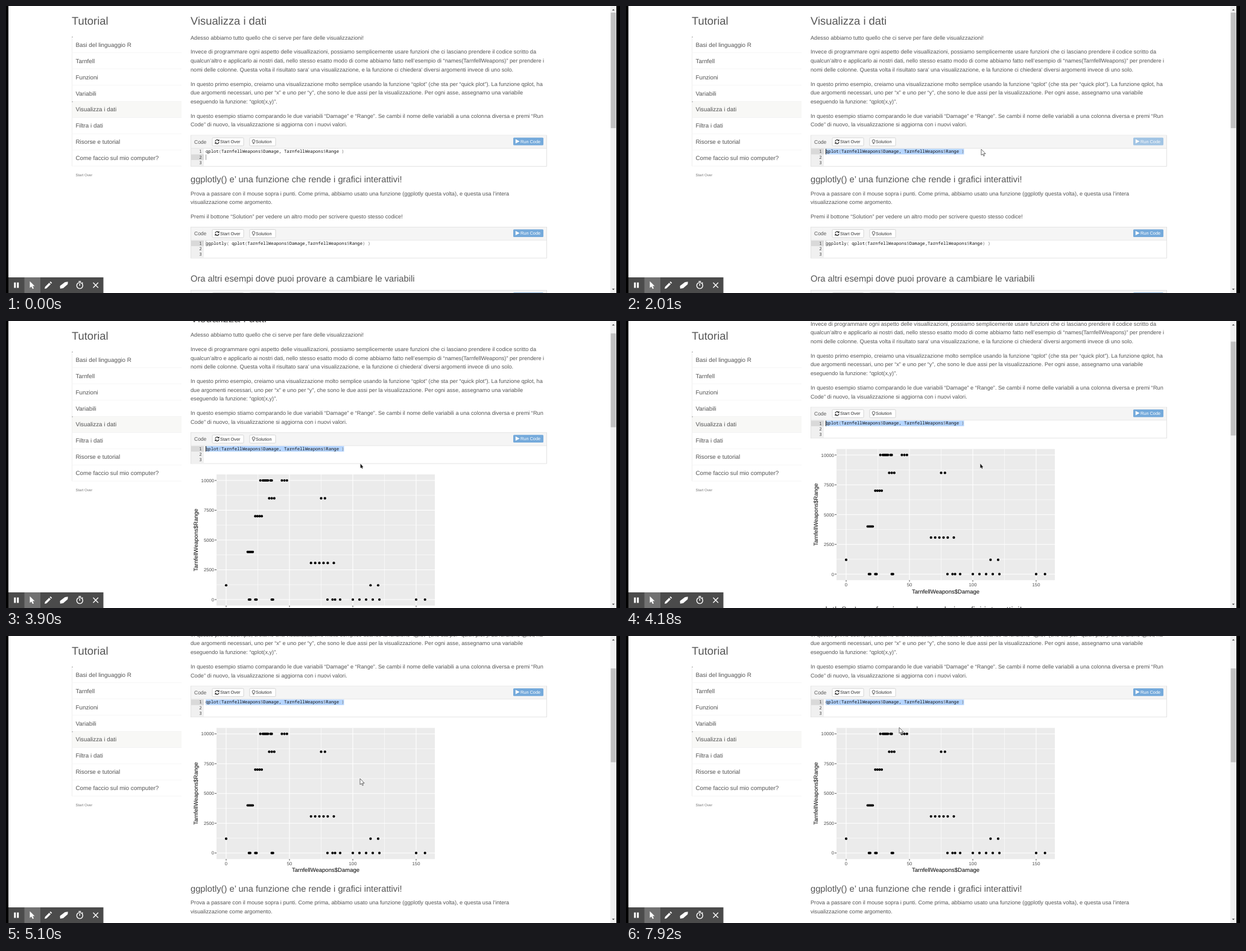
Write an HTML page that moves like this. It is 1018 by 477 pixels and loops after 8 s.

```html
<!DOCTYPE html>
<html lang="it">
<head>
<meta charset="utf-8">
<title>Tutorial</title>
<style>
html, body { margin: 0; width: 100%; height: 100%; overflow: hidden; background: #fff; }
svg { display: block; width: 1018px; height: 477px; }
text { font: 9.19px "Liberation Sans", Arial, sans-serif; fill: #555; text-rendering: geometricPrecision; white-space: pre; }
.h2 { font-size: 18.37px; }
.h3 { font-size: 14.7px; }
.menu { font-size: 9.84px; }
.tiny { font-size: 6.1px; fill: #777; }
.label { font-size: 8.5px; }
.btn { font-size: 7.35px; fill: #333; }
.run { font-size: 7.35px; fill: #fff; }
.code { font: 7.22px "Noto Sans Mono", "DejaVu Sans Mono", monospace; fill: #111; }
.code .p { fill: #777; }
.num { font: 7.22px "Noto Sans Mono", "DejaVu Sans Mono", monospace; fill: #444; text-anchor: end; }
.tick { font-size: 7.7px; fill: #4d4d4d; }
.axis { font-size: 9.54px; fill: #000; text-anchor: middle; }
</style>
</head>
<body>
<svg id="stage" viewBox="0 0 1018 477"></svg>
<script>
const text = (x, y, s, cls = '', more = '') => `<text x="${x}" y="${y}" class="${cls}" ${more}>${s}</text>`;
const rect = (x, y, w, h, fill, more = '') => `<rect x="${x}" y="${y}" width="${w}" height="${h}" fill="${fill}" ${more}/>`;
const path = (d, more) => `<path d="${d}" ${more}/>`;
const white = 'fill="#fff"';
const line = (color, width = 1) => `fill="none" stroke="${color}" stroke-width="${width}"`;

function menu() {
  const items = ['Basi del linguaggio R', 'Tarnfell', 'Funzioni', 'Variabili', 'Visualizza i dati',
    'Filtra i dati', 'Risorse e tutorial', 'Come faccio sul mio computer?'];
  const row = 26.9, top = 51;
  return text(109, 31.2, 'Tutorial', 'h2') +
    rect(109, top + 4 * row, 182, row, '#f8f8f6') +
    rect(109, top, 1, 8 * row, '#eee') +
    items.map((s, i) => rect(109, top + (i + 1) * row - .5, 182, .7, '#f2f2f2') +
      text(115.5, 67.8 + i * row, s, 'menu')).join('') +
    rect(109.5, top, 1, 1, '#555') + rect(109.5, top + 4 * row, 1, 1, '#555') +
    text(115.5, 282.8, 'Start Over', 'tiny');
}

const refresh = path('M346.9 225.2a3.1 3.1 0 0 1 5.4-1.8M353.1 226a3.1 3.1 0 0 1-5.4 1.8', line('#222', 1.2)) +
  path('M353.6 221.6v3h-3zM346.4 229.6v-3h3z', 'fill="#222"');
const bulb = path('M409.3 227.3c0-1.2-1.1-1.6-1.1-2.9a2.3 2.3 0 0 1 4.6 0c0 1.3-1.1 1.7-1.1 2.9zM409.4 228.7h2.2', line('#333', .8));

// One exercise box, placed relative to the first one
function editor(dy, code, first) {
  const parts = code.replace(/[()$]/g, c => `<tspan class="p">${c}</tspan>`);
  const button = (x, w) => rect(x, 219, w, 13.5, '#fff', 'rx="1.5" stroke="#ccc" stroke-width=".8"');
  return `<g transform="translate(0 ${dy})">` +
    rect(306.5, 215, 590, 51.5, '#fff', 'stroke="#ddd" stroke-width=".8"') +
    rect(307, 215.4, 589, 21, '#f5f5f5') + rect(306.5, 236.3, 590, .7, '#ddd') +
    rect(307, 237, 21, 29, '#f0f0f0') +
    rect(307, 237.3, 21, 9.3, '#d9d9d9', first ? 'id="active"' : '') +
    text(312, 228.5, 'Code', 'label') +
    button(342, 52) + refresh + text(355, 228.1, 'Start Over', 'btn') +
    button(404, 43) + bulb + text(414, 228.1, 'Solution', 'btn') +
    `<g ${first ? 'id="run"' : ''}>` + rect(841, 218.8, 50, 12.7, '#75aadb', 'rx="1.5"') +
    path('M844.8 221.2v7.4l6.8-3.7z', white) + text(853, 227.6, 'Run Code', 'run') + '</g>' +
    [1, 2, 3].map(n => text(324.7, 235 + n * 9.3, n, 'num')).join('') +
    (first ? rect(331, 237.3, 229.5, 9.3, '#b5d5ff', 'id="sel"') : '') +
    text(331, 244.1, parts, 'code') +
    (first ? rect(331, 237.5, 1, 9, '#000', 'id="caret"') : rect(331, 237.5, .7, 9, '#999')) + '</g>';
}

// Evenly spaced group of values
const run = (start, count = 1, step = 1) => Array.from({ length: count }, (_, i) => start + i * step);

function plot() {
  const px = v => 365 + v * 2.1, py = v => 492.5 - v * .0198;
  const points = {
    10000: [run(27), run(29, 5), run(35, 2), run(44, 3, 2)],
    8500: [run(34, 3, 2), run(75, 2, 3)],
    7000: [run(23, 4, 1.7)],
    4000: [run(17, 5)],
    3072: [run(67, 5, 3.3), run(85)],
    1200: [run(0), run(114, 2, 6)],
    0: [run(18, 2), run(23, 2), run(36, 2), run(80), run(84, 2, 2), run(90), run(100, 5, 5.25), run(150, 2, 7)]
  };
  let s = rect(349, 284.5, 362, 218, '#ebebeb');
  const grid = (d, i) => path(d, line('#fff', i % 2 ? .6 : 1.1));
  for (let i = 0; i < 9; i++) s += grid(`M349 ${py(i * 1250)}h362`, i);
  for (let i = 0; i < 7; i++) s += grid(`M${px(i * 25)} 284.5v218`, i);
  for (let v = 0; v <= 150; v += 50)
    s += path(`M${px(v)} 502.5v2.5`, line('#333', .9)) + text(px(v), 512.4, v, 'tick', 'text-anchor="middle"');
  for (let v = 0; v <= 10000; v += 2500)
    s += path(`M346.3 ${py(v)}h2.7`, line('#333', .9)) + text(345, py(v) + 2.8, v, 'tick', 'text-anchor="end"');
  for (const v in points)
    for (const u of points[v].flat()) s += `<circle cx="${px(u)}" cy="${py(v)}" r="2.1"/>`;
  return s + text(530, 524.3, 'TarnfellWeapons$Damage', 'axis') +
    text(0, 0, 'TarnfellWeapons$Range', 'axis', 'transform="translate(318 393.5) rotate(-90)"');
}

const intro = `Adesso abbiamo tutto quello che ci serve per fare delle visualizzazioni!

Invece di programmare ogni aspetto delle visuallizazioni, possiamo semplicemente usare funzioni che ci lasciano prendere il codice scritto da
qualcun’altro e applicarlo ai nostri dati, nello stesso esatto modo di come abbiamo fatto nell’esempio di “names(TarnfellWeapons)” per prendere i
nomi delle colonne. Questa volta il risultato sara’ una visualizzazione, e la funzione ci chiedera’ diversi argomenti invece di uno solo.

In questo primo esempio, creiamo una visualizzazione molto semplice usando la funzione “qplot” (che sta per “quick plot”). La funzione qplot, ha
due argomenti necessari, uno per “x” e uno per “y”, che sono le due assi per la visualizzazione. Per ogni asse, assegnamo una variabile
eseguendo la funzione: “qplot(x,y)”.

In questo esempio stiamo comparando le due variabili “Damage” e “Range”. Se cambi il nome delle variabili a una colonna diversa e premi “Run
Code” di nuovo, la visualizzazione si aggiorna con i nuovi valori.`;
const outro = `Prova a passare con il mouse sopra i punti. Come prima, abbiamo usato una funzione (ggplotly questa volta), e questa usa l’intera
visualizzazione come argomento.

Premi il bottone “Solution” per vedere un altro modo per scrivere questo stesso codice!`;

// Lines follow each other from y on; an empty line is a paragraph gap
const prose = (y, s) => s.split('\n').map(row => {
  const out = row && text(306, y, row);
  y += row ? 14.65 : 9.2;
  return out;
}).join('');

function toolbar() {
  return rect(4, 451, 157.5, 26, '#4b4b4b') + rect(30.5, 451, 26.5, 26, '#717171') +
    rect(13.3, 459.5, 3, 9, '#fff') + rect(18.2, 459.5, 3, 9, '#fff') +
    path('M39.5 457.5v11l2.6-2.2 2 4 2-1-2-3.8h3.4z', white) +
    path('M64 470l.8-3.3 6.8-6.8 2.5 2.5-6.8 6.8zM72.5 459l1.3-1.3 2.5 2.5-1.3 1.3z', white) +
    path('M89.5 465.2l8.2-6.2 5-.7-.4 4.2-7.5 6.6-5 .6z', white) +
    `<circle cx="122.3" cy="464.6" r="5" ${line('#fff', 1.4)}/>` +
    path('M120.3 457.7h4M122.3 461.5v3.4M126.2 459.6l1.2 1.2', line('#fff', 1.4)) +
    path('M144.5 459.8l8.4 8.4m0-8.4l-8.4 8.4', line('#fff', 1.4));
}

const cursors = {
  arrow: path('M0 0v10l2.3-2 1.7 3.5 1.5-.7-1.6-3.3h3.2z', 'fill="#fff" stroke="#444" stroke-width=".8"'),
  beam: path('M-1.5-5h3M0-5v10M-1.5 5h3', line('#222', .8)),
  dark: path('M0 0v7.2l1.6-1.3 1.2 2.3 1-.5-1-2.2h2z', 'fill="#111"')
};

stage.innerHTML = rect(0, 0, 1018, 477, '#fff') + menu() +
  '<g id="page">' + text(306, 31.2, 'Visualizza i dati', 'h2') + prose(55.6, intro) +
  editor(0, 'qplot(TarnfellWeapons$Damage, TarnfellWeapons$Range )', true) +
  `<g id="plot">${plot()}</g><g id="rest">` +
  text(306, 292.9, 'ggplotly() e’ una funzione che rende i grafici interattivi!', 'h3') + prose(314.8, outro) +
  editor(152.5, 'ggplotly( qplot(TarnfellWeapons$Damage,TarnfellWeapons$Range) )') +
  text(306, 458.3, 'Ora altri esempi dove puoi provare a cambiare le variabili', 'h3') +
  editor(257.5, '') + '</g></g>' +
  rect(1002, 0, 10, 477, '#f1f1f1') + rect(1002.7, 11, 8.6, 192, '#c1c1c1', 'id="thumb"') +
  path('M1004.8 7.5h4.4l-2.2-2.6zM1004.8 469.7h4.4l-2.2 2.6z', 'fill="#505050"') +
  rect(0, 0, 4, 477, '#000') + rect(1012, 0, 6, 477, '#000') + toolbar() + '<g id="pointer"></g>';

const part = Object.fromEntries([...stage.querySelectorAll('[id]')].map(el => [el.id, el]));
const set = (id, attrs) => { for (const k in attrs) part[id].setAttribute(k, attrs[k]); };
const ease = p => { p = Math.min(1, Math.max(0, p)); return p * p * (3 - 2 * p); };

// Mouse way points: time, x, y
const way = [
  [150, 588, 243], [1170, 282, 217], [1850, 589, 238], [5100, 587, 237], [5230, 600, 247], [5710, 428, 160],
  [6190, 393, 187], [6620, 430, 155], [7045, 537, 110], [7340, 480, 231], [7630, 405, 198], [7910, 453, 152]
];
function mouse(t) {
  const i = Math.max(0, way.findLastIndex(w => w[0] <= t));
  const a = way[i], b = way[i + 1] || a, p = ease((t - a[0]) / (b[0] - a[0] || 1));
  return [a[1] + (b[1] - a[1]) * p, a[2] + (b[2] - a[2]) * p];
}

// Two wheel notches
const scrollAt = t => 65.9 * (ease((t - 3684) / 430) + ease((t - 4107) / 353));

const tick = 144, phase = 3740 % tick;
const hold = t => phase + tick * Math.floor((t - phase) / tick);

function draw() {
  const t = performance.now() % 8000, shown = hold(t);
  const [x, y] = mouse(shown), scroll = scrollAt(shown);
  const clicked = t >= 300, plotted = t >= 3010, dragging = t < 1170;

  set('page', { transform: `translate(0 ${-scroll})` });
  set('plot', { visibility: plotted ? 'visible' : 'hidden' });
  set('rest', { transform: `translate(0 ${plotted ? 263.5 : 0})` });
  set('thumb', { y: 11 + scroll * .325, height: plotted ? 156 : 192 });
  set('run', { opacity: t >= 2010 && !plotted ? .65 : 1 });

  // Dragging leftwards selects one character after another
  const letter = 4.33, all = 53, end = 331 + all * letter;
  const chars = dragging ? Math.min(all, Math.max(0, Math.round((end - x) / letter))) : all;
  const left = end - chars * letter;
  set('sel', { x: left, width: chars * letter });
  set('active', { y: clicked ? 237.3 : 246.6 });
  const blink = (plotted && t < 3740) || t >= 4730;
  set('caret', { x: clicked ? left : 331, y: clicked ? 237.5 : 246.8, fill: clicked ? '#000' : '#999', opacity: blink ? 0 : 1 });

  const kind = t < 1850 && x > 328 ? 'beam' : t >= 3740 && t < 4730 ? 'dark' : 'arrow';
  part.pointer.innerHTML = t < 150 ? '' : cursors[kind];
  set('pointer', { transform: `translate(${x} ${y})` });
  requestAnimationFrame(draw);
}
draw();
</script>
</body>
</html>
```
